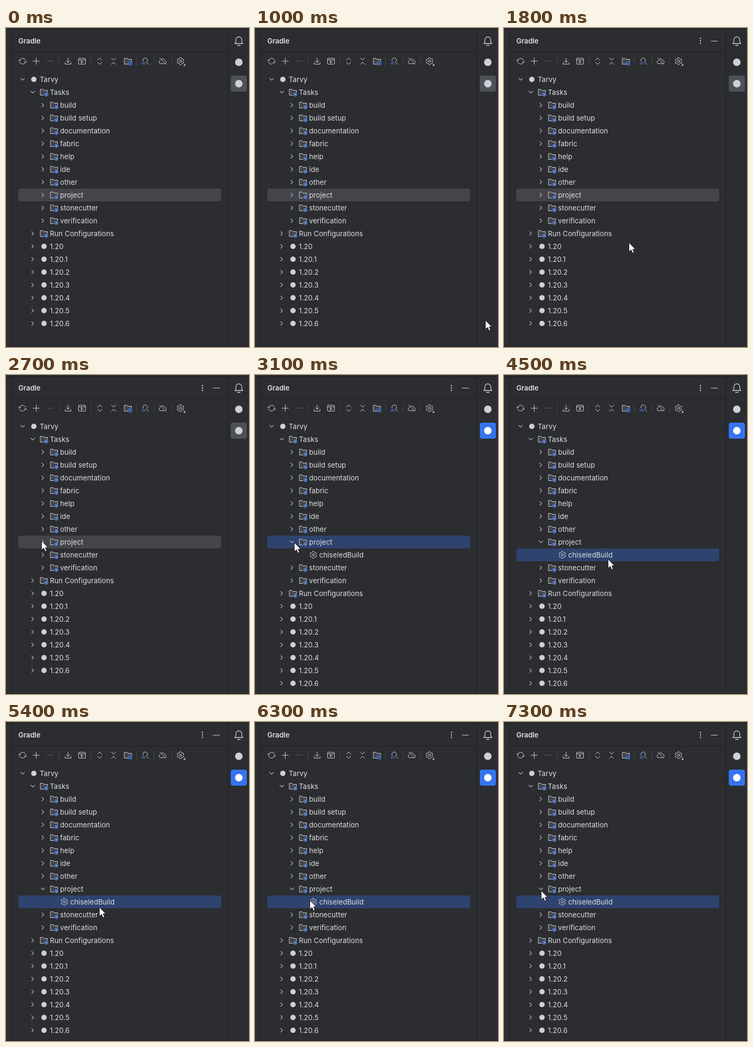
These frames come from a looping animation (454x596 px, 8 s). An HTML page:

```html
<!DOCTYPE html>
<html lang="en">
<head>
<meta charset="utf-8">
<title>Build tool panel</title>
<style>
  html, body { margin: 0; width: 100%; height: 100%; overflow: hidden; background: #2b2d30; }
  svg { display: block; }
  text { font: 13px Inter, sans-serif; fill: #dfe1e5; letter-spacing: .1px; }
  .title { font-weight: 600; letter-spacing: 0; }
  .ico { fill: none; stroke: #ced0d6; stroke-linecap: round; stroke-linejoin: round; }
  .chev { fill: none; stroke: #a9acb3; stroke-width: 1.1; stroke-linecap: round; stroke-linejoin: round; }
  .edge { stroke: #1e1f22; }
  .sep { stroke: #43454a; }
  .blue { stroke: #548af7; }
  .dim { stroke: #5a5d63; }
  .dot { fill: #ced0d6; stroke: none; }
  .panel { fill: #2b2d30; stroke: none; }
</style>
</head>
<body>
<svg id="stage" width="454" height="596" viewBox="0 0 454 596"></svg>
<script>
const LOOP = 8000, STEP = 100, ROW = 24, TOP = 96, BAR = 62;
const SHOW_HEAD = 1300, OPEN = 3000, PICK = 4200;
const WAVE = { from: 3800, to: 5600, peak: 4500, period: 1060 };
const RIGHT = 'M-2-3.5l3.5 3.5-3.500 3.500', DOWN = 'M-3.500-2l3.500 3.500 3.500-3.500';
const $ = id => document.getElementById(id);
const at = (x, y, body) => `<g transform="translate(${x} ${y})">${body}</g>`;
const line = (d, cls = '') => `<path class="${cls}" d="${d}"/>`;
const twice = body => body + `<g transform="rotate(180)">${body}</g>`;

// Closed polygon whose corner radii repeat the given pattern
function polygon(n, radii, turn = 0) {
  const pts = Array.from({ length: n }, (_, i) => {
    const a = (i + turn) / n * 2 * Math.PI, r = radii[i % radii.length];
    return (r * Math.sin(a)).toFixed(2) + ' ' + (-r * Math.cos(a)).toFixed(2);
  });
  return 'M' + pts.join('L') + 'Z';
}

const gear = line(polygon(24, [6.6, 6.6, 5, 5], -0.5)) + '<circle r="2.1"/>';
const folder = '<path d="M-6.5-5.5h4.300l2.200 2h6.500v9h-13z" fill="#43454a"/>';
const badge = line(polygon(6, [5]), 'panel')
  + `<path d="${polygon(6, [3.4])}" fill="#25324d" class="blue" stroke-width="1.3"/><circle r="1" fill="#548af7"/>`;
const defs = {
  folder,
  gear,
  taskFolder: folder + at(4, 4, badge),
  mark: '<circle class="dot" r="5"/>'
};

const tools = {
  31: twice(line('M-5.800-.5a5.800 5.200 0 0 1 10.600-2.600l1 1.600M-7.500-2.300l1.700 2 2.200-1.600')),
  56.5: line('M0-6v12M-6 0h12'),
  82.5: line('M-6 0h12', 'dim'),
  116: line('M0-6v8.500M-3.500-1l3.500 3.500 3.500-3.500M-5.500 2.500v3h11v-3'),
  142: '<rect x="-6.500" y="-5.500" width="13" height="11" rx="1.500"/>' + line('M-6.500-2.500h13M-1.500-.5v4l3.500-2z'),
  175: twice(line('M-4-2l4-4 4 4')),
  201: twice(line('M-4-6l4 4 4-4')),
  228: folder + line('M0 0h8v8h-8z', 'panel') + line('M1 1h6v6h-6zM4 1v6M1 4h6', 'blue'),
  260: line('M-3.900-.4a4.300 4.300 0 1 1 6.200 2.400M3 2.500l3.600 3.600') + line('M-5.500 3v3M-3 1v5M-.5 3v3', 'blue'),
  293: line('M-2.500-3.800a4 4 0 0 1 6 2.400 3.200 3.200 0 0 1 2 5.400M3 4.700h-7a3.200 3.200 0 0 1-.8-6.200M-6-6l12 12'),
  326: gear + line('M9 4.500v4h-4z', 'dot')
};

// [depth, label, icon, expanded]
const tasks = names => names.split(',').map(s => [2, s, 'taskFolder']);
const rows = [
  [0, 'Tarvy', 'mark', true],
  [1, 'Tasks', 'taskFolder', true],
  ...tasks('build,build setup,documentation,fabric,help,ide,other,project'),
  [3, 'chiseledBuild', 'gear'],
  ...tasks('stonecutter,verification'),
  [1, 'Run Configurations', 'taskFolder'],
  ...Array.from({ length: 7 }, (_, i) => [1, '1.20' + (i ? '.' + i : ''), 'mark'])
];
const PROJECT = rows.findIndex(r => r[1] === 'project');
const CHILD = PROJECT + 1;

function rowMarkup([depth, label, icon, open]) {
  const arrow = depth < 3 ? at(31, 0, line(open ? DOWN : RIGHT, 'chev')) : '';
  const body = `${arrow}<use href="#${icon}" x="52" class="ico"/><text x="63" y="5">${label}</text>`;
  return `<g>${at(19 * depth, 0, body)}</g>`;
}

$('stage').innerHTML = `
  <defs>${Object.entries(defs).map(([id, body]) => `<g id="${id}">${body}</g>`).join('')}</defs>
  <rect width="454" height="596" class="panel"/>
  ${line('M0 2.500H454M10.500 3V596M414.500 3V596M11 44.500H414M0 595.500H454', 'edge')}
  <text class="title" x="23" y="29">Gradle</text>
  <g id="head" class="ico">
    ${line('M387 24.500h12')}
    ${[19.5, 24, 28.5].map(y => `<circle class="dot" cx="367" cy="${y}" r="1.200"/>`).join('')}
  </g>
  ${[99, 158, 243, 276, 309].map(x => line(`M${x}.5 54v16`, 'sep')).join('')}
  <g class="ico">${Object.entries(tools).map(([x, body]) => at(x, BAR, body)).join('')}</g>
  <g class="ico" stroke-width="1.300">${line('M427.500 29l2-3v-4a5.500 5.500 0 0 1 11 0v4l2 3zM432.500 32.500h5')}</g>
  <circle class="dot" cx="435" cy="64" r="7"/>
  <rect id="tool" x="420" y="89" width="30" height="30" rx="4"/>
  <circle id="toolMark" cx="435" cy="104" r="7"/>
  <rect id="sel" x="23" width="379" height="24" rx="4"/>
  <g id="tree">${rows.map(rowMarkup).join('')}</g>
  <path id="cursor" d="M.5 0V17L4.500 13.300 7.200 19.500 10 18.300 7.400 12.300H12.300Z" fill="#fff" stroke="#17181a" stroke-width=".9" stroke-linejoin="round"/>`;

const items = [...$('tree').children];
const arrow = items[PROJECT].querySelector('.chev');

// Pointer stops: [time, x, y]
const stops = [
  [800, 450, 588], [1600, 371, 421], [1800, 233, 401], [2200, 70, 306],
  [2500, 172, 371], [2700, 66, 310], [OPEN, 66, 310], [WAVE.from, 125, 333],
  [WAVE.to, 192, 346], [5800, 192, 346], [6500, 66, 328], [6700, 101, 329],
  [6900, 70, 321], [7100, 70, 321], [7300, 69, 315], [LOOP, 69, 315]
];

function pointerAt(t) {
  // Sweeps back and forth under the task name
  if (t > WAVE.from && t < WAVE.to) {
    const swing = Math.cos((t - WAVE.peak) / WAVE.period * 2 * Math.PI);
    return [146 + 48 * swing, 333 + 13 * Math.min(1, (t - WAVE.from) / 800)];
  }
  const i = stops.findIndex(s => s[0] > t);
  const [a, b] = [stops[i - 1], stops[i]];
  const k = (t - a[0]) / (b[0] - a[0]);
  return [1, 2].map(n => a[n] + (b[n] - a[n]) * k);
}

function draw(ms) {
  const t = Math.floor(ms % LOOP / STEP) * STEP;
  const open = t >= OPEN;
  const visible = t >= stops[0][0];

  $('head').style.display = t >= SHOW_HEAD ? '' : 'none';
  $('tool').setAttribute('fill', open ? '#3574f0' : '#4e5157');
  $('toolMark').setAttribute('fill', open ? '#fff' : '#ced0d6');

  items.forEach((g, i) => {
    const slot = i > PROJECT && !open ? i - 1 : i;
    g.setAttribute('transform', `translate(0 ${TOP + ROW * slot})`);
  });
  items[CHILD].style.display = open ? '' : 'none';
  arrow.setAttribute('d', open ? DOWN : RIGHT);

  const row = t >= PICK ? CHILD : PROJECT;
  $('sel').setAttribute('y', TOP + ROW * (row - 0.5));
  $('sel').setAttribute('fill', open ? '#2e436e' : '#43454a');

  $('cursor').style.display = visible ? '' : 'none';
  if (visible) $('cursor').setAttribute('transform', `translate(${pointerAt(t).map(Math.round).join(' ')})`);
}

const start = performance.now();
function tick() {
  draw(performance.now() - start);
  requestAnimationFrame(tick);
}
tick();
</script>
</body>
</html>
```
